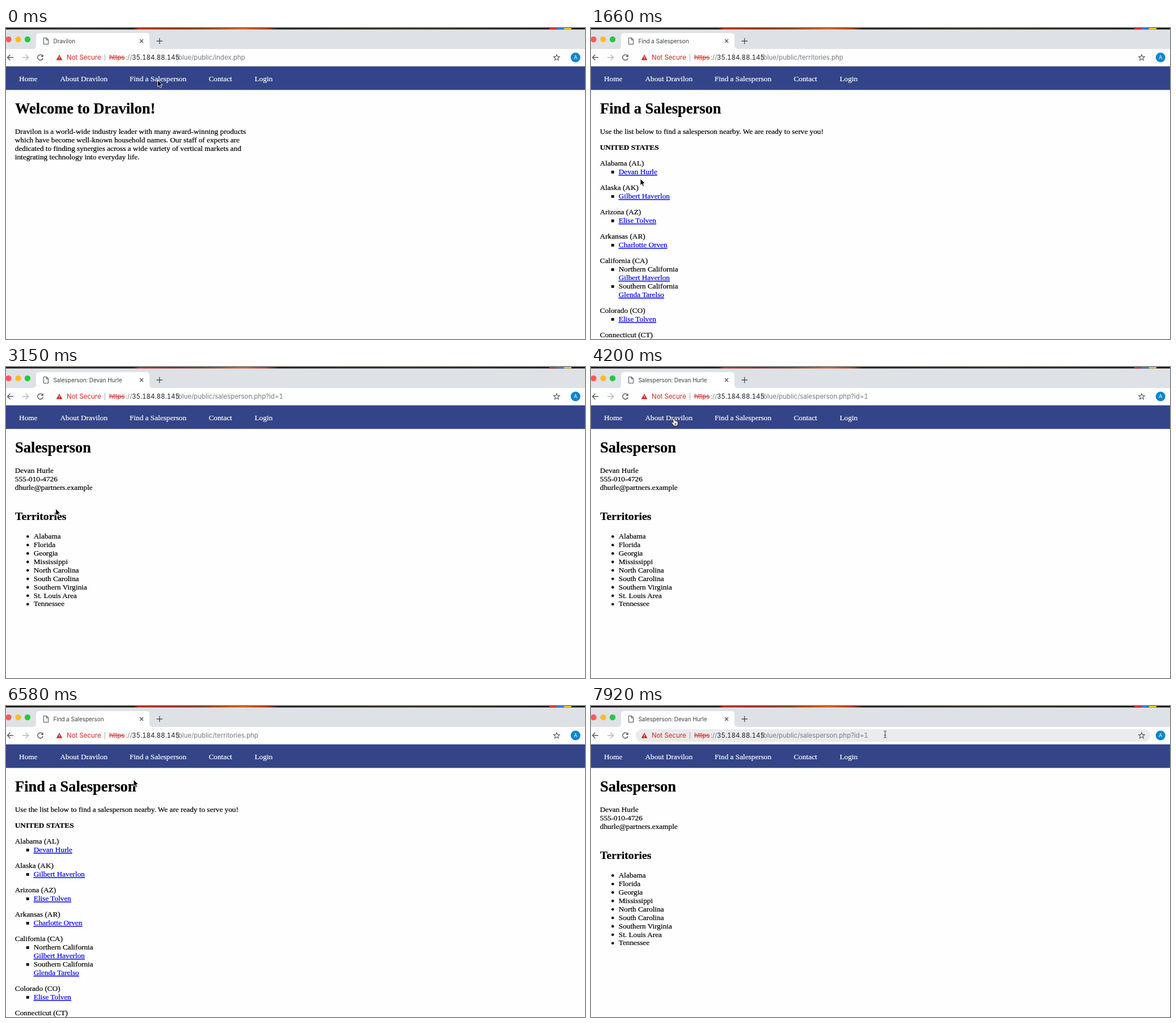
These frames come from a looping animation (1021x549 px, 8 s). An HTML page:

```html
<!DOCTYPE html>
<html lang="en">
<head>
<meta charset="utf-8">
<title>Browser walkthrough</title>
<style>
  html, body { margin: 0; width: 100%; height: 100%; overflow: hidden; background: #fefefe; }
  svg { display: block; }
  text { white-space: pre; }
  .page { font: 13.25px "Liberation Serif", serif; color: #000; }
  .page text { fill: currentColor; stroke: currentColor; stroke-width: 0.22px; }
  .h1 { font-size: 26.5px; font-weight: bold; }
  .h2 { font-size: 19.8px; font-weight: bold; }
  .bold { font-weight: bold; }
  .link { color: #00e; text-decoration: underline; }
  .nav { color: #fff; }
  .chrome { font: 11.5px Inter, sans-serif; font-variant-numeric: tabular-nums; }
  .title { font-size: 9.93px; fill: #3c4043; }
  .icon { fill: none; stroke: #53575c; stroke-width: 1.4; }
  .red { fill: #d0261f; }
  .grey { fill: #777b80; }
</style>
</head>
<body>
<svg width="1021" height="549" viewBox="0 0 1021 549">
  <defs>
    <linearGradient id="desktop">
      <stop offset="0" stop-color="#17130f"/><stop offset=".1" stop-color="#2b2114"/>
      <stop offset=".22" stop-color="#1c1712"/><stop offset=".23" stop-color="#b5280f"/>
      <stop offset=".29" stop-color="#8e2410"/><stop offset=".34" stop-color="#7a3a12"/>
      <stop offset=".41" stop-color="#d4580f"/><stop offset=".45" stop-color="#a63210"/>
      <stop offset=".47" stop-color="#1d1710"/><stop offset=".7" stop-color="#2c2712"/>
      <stop offset="1" stop-color="#14110d"/>
    </linearGradient>
  </defs>
  <rect width="1021" height="549" fill="#fefefe"/>
  <rect width="1021" height="37" fill="#dee1e6"/>
  <rect width="1021" height="2.5" fill="url(#desktop)"/>
  <path d="M958 0h13v2.5h-13z" fill="#d92b2b"/>
  <path d="M971 0h13v2.5h-13z" fill="#2b7de0"/>
  <path d="M984 0h13v2.5h-13z" fill="#f0c62e"/>
  <path d="M47 37q6 0 6-6V15q0-6 6-6H247q6 0 6 6v16q0 6 6 6z" fill="#fff"/>
  <circle cx="4.5" cy="20" r="5.2" fill="#fc5b57"/>
  <circle cx="21.5" cy="20" r="5.2" fill="#fdbc2e"/>
  <circle cx="38" cy="20" r="5.2" fill="#27c840"/>
  <rect id="hover" x="79" y="41" width="907" height="22.5" rx="11.2" fill="#e9ebed"/>

  <g class="icon">
    <path d="M236 20l6 6m0-6l-6 6M265.500 23h10.400m-5.200-5.200v10.400"/>
    <path d="M13 52H2.500m5-5l-5 5 5 5"/>
    <path d="M29 52h10.500m-5-5l5 5-5 5" stroke="#b4b7bb"/>
    <path d="M971 46.900l1.500 3.500 3.800.3-2.900 2.500.9 3.700-3.300-2-3.300 2 .9-3.700-2.900-2.500 3.800-.3z" stroke-width="1.100"/>
    <path d="M174.300 46v12.500" stroke="#a7aaae" stroke-width="1"/>
    <g id="idle">
      <path d="M66.500 17.500h5l3 3v8h-8zM71 17.500v3.500h3.500" stroke-width="1.100"/>
      <path d="M64 48.600A4.800 4.800 0 1 0 65.200 53.300"/>
      <path d="M65.700 46.500v4.500h-4.500z" fill="#53575c" stroke="none"/>
    </g>
    <g id="loading">
      <path d="M56 47.600l9 9m0-9l-9 9"/>
      <circle cx="70" cy="18.300" r=".8" fill="#777b80" stroke="none"/>
    </g>
  </g>
  <path d="M94 47l5.400 9.800H88.600z" class="red"/>
  <path d="M94 50.200v3m0 1v1.300" stroke="#fff" stroke-width="1.100"/>
  <g class="chrome">
    <text x="107" y="56" class="red">Not Secure</text>
    <text x="182" y="56" class="red" text-decoration="line-through">https</text>
    <text x="211" y="56" class="grey">://</text>
    <text x="222" y="56" fill="#202124">35.184.88.145</text>
    <text x="299.500" y="56" class="grey" id="path"></text>
    <text x="83.500" y="26.700" class="title" id="title"></text>
    <circle cx="1004.300" cy="52" r="8.500" fill="#0b85cf"/>
    <text x="1004.300" y="55.300" font-size="9" fill="#fff" text-anchor="middle">A</text>
  </g>

  <rect y="67" width="1021" height="1" fill="#c3c7d3"/>
  <rect y="68" width="1021" height="41.300" fill="#334488"/>
  <g class="page" id="nav"></g>
  <g class="page" id="home"></g>
  <g class="page" id="list"></g>
  <g class="page" id="person"></g>
  <path id="cursor"/>
</svg>
<script>
const $ = id => document.getElementById(id);
const LINE = 14.93;
const text = (x, y, s, cls = '') => `<text x="${x}" y="${y}" class="${cls}">${s}</text>`;
const lines = (x, y, rows) => rows.map((s, i) => text(x, y + i * LINE, s)).join('');
const square = y => `<rect x="35.8" y="${y - 6.2}" width="4.8" height="4.8"/>`;
const disc = y => `<circle cx="38.3" cy="${y - 3.7}" r="2.3"/>`;

const COMPANY = 'Dravilon', SELLER = 'Devan Hurle';

$('nav').innerHTML = [[23, 'Home'], [95.5, 'About ' + COMPANY], [218, 'Find a Salesperson'],
  [357.5, 'Contact'], [438.5, 'Login']].map(([x, s]) => text(x, 93.7, s, 'nav')).join('');

$('home').innerHTML = text(16, 151, `Welcome to ${COMPANY}!`, 'h1') + lines(15.8, 187.2, [
  COMPANY + ' is a world-wide industry leader with many award-winning products',
  'which have become well-known household names. Our staff of experts are',
  'dedicated to finding synergies across a wide variety of vertical markets and',
  'integrating technology into everyday life.']);

// Each state: its name, then either [seller] or [region, seller] entries.
const states = [
  ['Alabama (AL)', [SELLER]],
  ['Alaska (AK)', ['Gilbert Haverlon']],
  ['Arizona (AZ)', ['Elise Tolven']],
  ['Arkansas (AR)', ['Charlotte Orven']],
  ['California (CA)', ['Northern California', 'Gilbert Haverlon'], ['Southern California', 'Glenda Tarelso']],
  ['Colorado (CO)', ['Elise Tolven']],
  ['Connecticut (CT)']
];
let y = 243.2;
let rows = '';
for (const [state, ...entries] of states) {
  rows += text(15.8, y, state);
  for (const entry of entries) {
    rows += square(y + LINE);
    entry.forEach((s, i) => rows += text(48.8, y += LINE, s, i === entry.length - 1 ? 'link' : ''));
  }
  y += 28.1;
}
$('list').innerHTML = text(16, 151, 'Find a Salesperson', 'h1') +
  text(15.8, 187.2, 'Use the list below to find a salesperson nearby. We are ready to serve you!') +
  text(15.8, 215.2, 'UNITED STATES', 'bold') + rows;

const territories = ['Alabama', 'Florida', 'Georgia', 'Mississippi', 'North Carolina', 'South Carolina',
  'Southern Virginia', 'St. Louis Area', 'Tennessee'];
$('person').innerHTML = text(16, 151, 'Salesperson', 'h1') +
  lines(15.8, 187.2, [SELLER, '555-010-4726', 'dhurle@partners.example']) +
  text(16, 270.2, 'Territories', 'h2') + lines(48.8, 303, territories) +
  territories.map((_, i) => disc(303 + i * LINE)).join('');

const pages = {
  home: [COMPANY, 'index.php'],
  list: ['Find a Salesperson', 'territories.php'],
  person: ['Salesperson: ' + SELLER, 'salesperson.php?id=1']
};
const visits = [[0, 'home'], [4, 'list'], [14, 'person'], [40, 'list'], [50, 'person']];
const loadingTicks = [3, 39, 49];

const shapes = {
  arrow: ['M0 0V11.8L2.7 9.300 4.500 13.500 6.600 12.600 4.800 8.500H8.500Z', '#000', '#fff'],
  hand: ['M-.7.6Q.5-.4 1.300.8L2.500 4.600Q3.500 4 4.300 4.900 5.500 4.400 6.100 5.400 7.500 5.100 7.700 6.700L7.900 9.500 6.900 13.500H1L-2.900 9.200Q-4.400 7.300-3.200 6.800-2 6.400-.4 8L-1.300 1.700Q-1.400 1-.7.6ZM2.600 8.500v3m1.800-3v3', '#fff', '#000'],
  beam: ['M-2.500-6Q0-6 0-4.500 0-6 2.500-6M0-4.500V4.500M-2.500 6Q0 6 0 4.500 0 6 2.500 6M-1.500 1.500h3', 'none', '#222']
};
// Cursor waypoints: tick, x, y, shape.
const path = [
  [0, 267.5, 92, 'arrow'], [1, 268.5, 93, 'hand'], [7, 268.5, 93, 'hand'], [8, 235, 148, 'arrow'],
  [9, 140, 248, 'arrow'], [10, 96, 291, 'hand'], [11, 87, 266, 'arrow'], [12, 86.5, 253.5, 'hand'],
  [15, 86.5, 253.5, 'hand'], [16, 84, 262, 'arrow'], [18, 72, 300, 'arrow'], [20, 80, 270, 'arrow'],
  [23, 103, 211, 'arrow'], [24, 103, 211, 'arrow'], [25, 160, 122, 'arrow'], [26, 188, 78, 'hand'],
  [27, 188, 78, 'hand'], [28, 145.5, 90.5, 'hand'], [30, 165, 96, 'hand'], [32, 205, 103, 'hand'],
  [35, 260, 91, 'hand'], [38, 265.5, 89.5, 'hand'], [43, 265.5, 89.5, 'hand'], [44, 225, 130, 'arrow'],
  [46, 110, 240, 'arrow'], [48, 87, 258.5, 'hand'], [50, 87, 258.5, 'hand'], [51, 180, 185, 'arrow'],
  [52, 400, 85, 'hand'], [53, 518.700, 50, 'beam']
];

const TICK = 149.4, LOOP = 8000;
const show = (id, on) => $(id).style.display = on ? '' : 'none';

function placeCursor(tick) {
  const i = path.findLastIndex(p => p[0] <= tick);
  const [t0, x0, y0, shape] = path[i];
  const [t1, x1, y1] = path[i + 1] || [t0 + 1, x0, y0];
  const k = (tick - t0) / (t1 - t0);
  const [d, fill, stroke] = shapes[shape];
  const attrs = { d, fill, stroke, 'stroke-width': 0.9,
    transform: `translate(${x0 + (x1 - x0) * k} ${y0 + (y1 - y0) * k})` };
  for (const name in attrs) $('cursor').setAttribute(name, attrs[name]);
}

function draw(now) {
  const tick = Math.floor(now % LOOP / TICK);
  const page = visits.findLast(v => v[0] <= tick)[1];
  for (const id in pages) show(id, id === page);
  $('title').textContent = pages[page][0];
  $('path').textContent = '/blue/public/' + pages[page][1];
  const loading = loadingTicks.includes(tick);
  show('loading', loading);
  show('idle', !loading);
  show('hover', tick >= 53);
  placeCursor(tick);
}

const start = performance.now();
function frame() {
  draw(performance.now() - start);
  requestAnimationFrame(frame);
}
frame();
</script>
</body>
</html>
```
